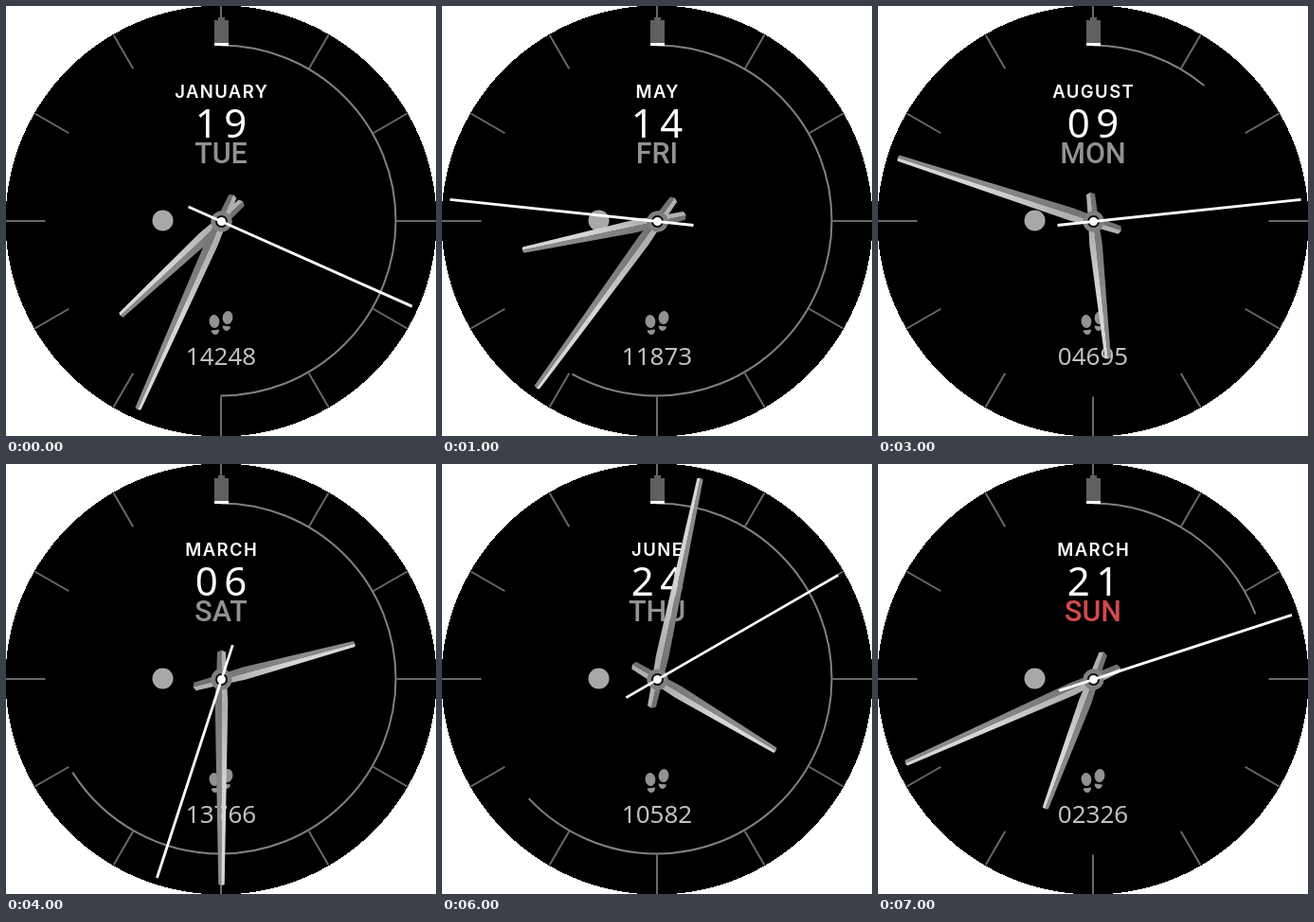
Recreate the animation shown at these times as an HTML page with a canvas. Size 454x454 px, loop 8000 ms.

```html
<!DOCTYPE html>
<html lang="en">
<head>
<meta charset="utf-8">
<title>Watch face</title>
<style>
  html, body { margin: 0; width: 100%; height: 100%; overflow: hidden; background: #fff; }
  canvas { display: block; }
</style>
</head>
<body>
<canvas id="face" width="454" height="454"></canvas>
<script>
const ctx = document.getElementById('face').getContext('2d');
const C = 227, STEP = 1000, TAU = Math.PI * 2;

// time, month, date, weekday, steps, battery percent
const states = [
  ['7:34:19', 'JANUARY', '19', 'TUE', '14248', 50],
  ['8:36:46', 'MAY', '14', 'FRI', '11873', 58],
  ['0:26:46', 'MARCH', '04', 'THU', '09299', 82],
  ['5:48:14', 'AUGUST', '09', 'MON', '04695', 11],
  ['2:30:33', 'MARCH', '06', 'SAT', '13766', 66],
  ['6:55:59', 'JANUARY', '01', 'FRI', '07506', 1],
  ['4:02:10', 'JUNE', '24', 'THU', '10582', 63],
  ['6:41:12', 'MARCH', '21', 'SUN', '02326', 19]
];

function disc(x, y, r, color) {
  ctx.fillStyle = color;
  ctx.beginPath();
  ctx.arc(x, y, r, 0, TAU);
  ctx.fill();
}

function box(x, y, w, h, color) {
  ctx.fillStyle = color;
  ctx.fillRect(x, y, w, h);
}

function shape(points, fill) {
  ctx.fillStyle = fill;
  ctx.beginPath();
  points.forEach(([x, y]) => ctx.lineTo(x, y));
  ctx.closePath();
  ctx.fill();
}

function text(value, y, font, color, spacing = 0) {
  ctx.font = font;
  ctx.letterSpacing = spacing + 'px';
  ctx.fillStyle = color;
  ctx.fillText(value, C + spacing / 2, y);
}

// Draw in a frame that points up along the given turn (0..1).
function turned(turn, draw) {
  ctx.save();
  ctx.translate(C + 0.5, C + 0.5);
  ctx.rotate(turn * TAU);
  draw();
  ctx.restore();
}

function shade(length, tail, middle, tip) {
  const g = ctx.createLinearGradient(0, 30, 0, -length);
  g.addColorStop(0, tail);
  g.addColorStop(0.25, middle);
  g.addColorStop(0.6, tip);
  return g;
}

// side is -1 when the lit half is on the left, 1 when on the right
function hand(turn, length, side) {
  turned(turn, () => {
    const half = s => [[0, -length], [s * 3.2, -length + 1], [s * 6.8, -25],
                       [s * 5.5, 0], [s * 4.5, 29], [0, 31]];
    shape(half(-side), shade(length, '#707070', '#787878', '#8a8a8a'));
    shape(half(side), shade(length, '#b0b0b0', '#b0b0b0', '#d6d6d6'));
    disc(0, 0, 11, '#808080');
  });
}

// A disc with a hard, stepped edge.
function drawPlate() {
  for (let y = 0; y < 454; y++) {
    const dy = y + 0.5 - C;
    const half = Math.round(Math.sqrt(227.5 ** 2 - dy * dy));
    box(C - half, y, half * 2, 1, '#000');
  }
}

function drawDial(percent) {
  ctx.strokeStyle = '#686868';
  ctx.lineWidth = 2;
  for (let i = 0; i < 12; i++) {
    const a = i * TAU / 12, x = Math.sin(a), y = -Math.cos(a);
    ctx.beginPath();
    ctx.moveTo(C + x * 185.5, C + y * 185.5);
    ctx.lineTo(C + x * 227, C + y * 227);
    ctx.stroke();
  }
  ctx.strokeStyle = '#808080';
  ctx.beginPath();
  ctx.arc(C - 0.5, C - 0.5, 185, -TAU / 4, -TAU / 4 + percent / 100 * TAU);
  ctx.stroke();
}

function footprint(x, y, tilt) {
  ctx.save();
  ctx.translate(x, y);
  ctx.rotate(tilt);
  ctx.fillStyle = '#929292';
  ctx.beginPath();
  ctx.ellipse(0, -3.5, 5.4, 7, 0, 0, TAU);
  ctx.fill();
  ctx.beginPath();
  ctx.ellipse(0, 5.5, 4.2, 5, 0, 0, TAU / 2);
  ctx.fill();
  ctx.restore();
}

function drawIcons() {
  box(224, 12, 7, 4, '#606060');
  box(220, 15, 15, 24, '#606060');
  box(220, 39, 15, 3, '#fff');
  disc(165.5, 226.5, 11, '#a8a8a8');
  footprint(220.3, 336.5, -0.1);
  footprint(233.6, 332.5, 0.12);
}

function draw([time, month, date, day, steps, percent]) {
  const [h, m, s] = time.split(':').map(Number);
  ctx.clearRect(0, 0, 454, 454);
  drawPlate();
  drawDial(percent);
  drawIcons();

  ctx.textAlign = 'center';
  text(month, 97, '600 18.5px Inter, sans-serif', '#fff', 1.4);
  text(date, 139, '42px "Noto Sans", sans-serif', '#fff', 6.5);
  text(day, 166, '500 30.5px Roboto, sans-serif', day === 'SUN' ? '#d24a4a' : '#929292');
  text(steps, 379, '26px "Noto Sans", sans-serif', '#c0c0c0');

  hand((h + m / 60) / 12, 146, 1);
  hand(m / 60, 217.5, -1);
  disc(C + 0.5, C + 0.5, 6.5, '#000');
  turned(s / 60, () => box(-1.4, -220.3, 2.8, 258.5, '#fff'));
  disc(C + 0.5, C + 0.5, 4.5, '#fff');
}

function tick(now) {
  draw(states[Math.floor(now / STEP) % states.length]);
  requestAnimationFrame(tick);
}
tick(performance.now());
</script>
</body>
</html>
```
